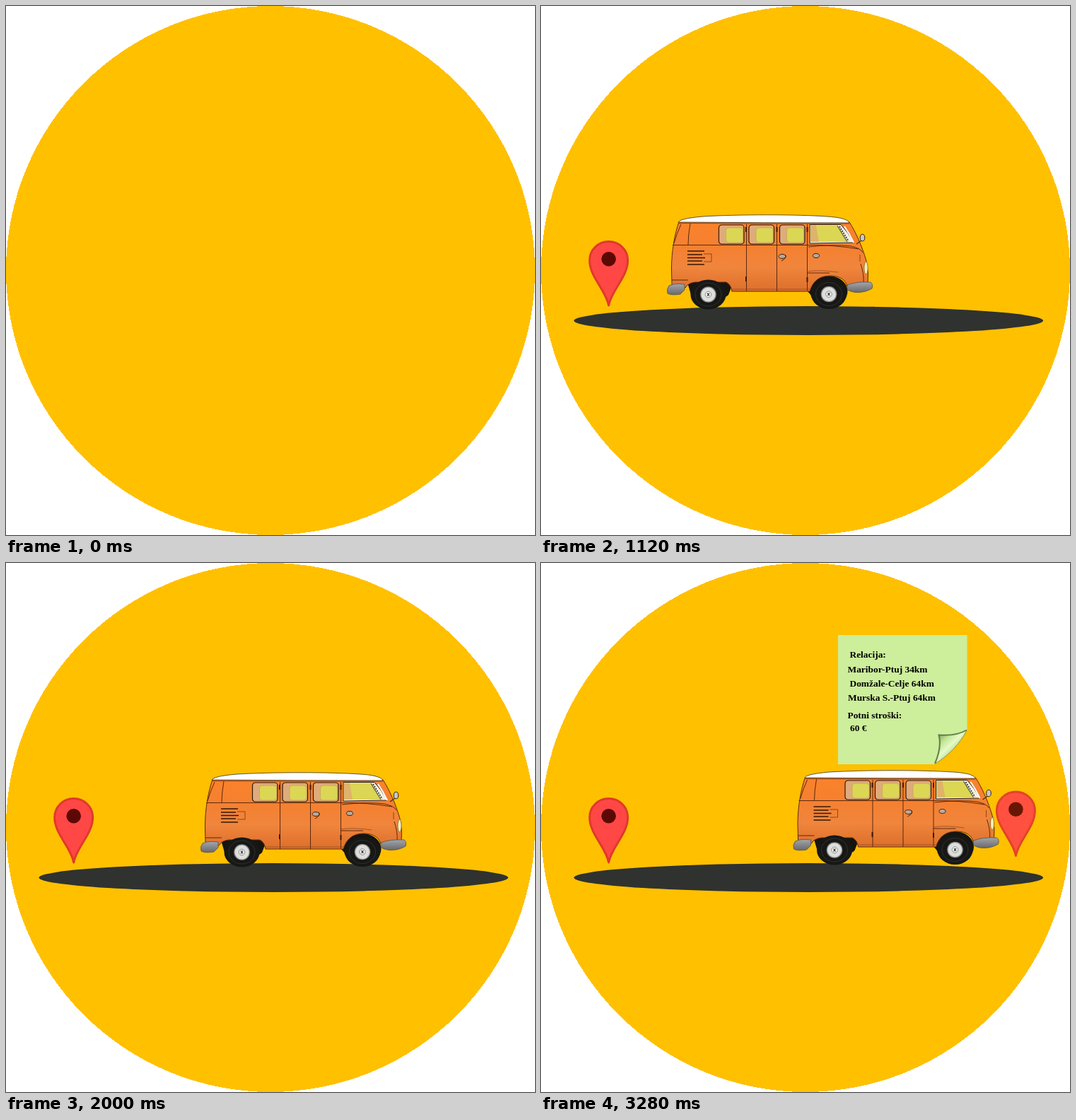
These frames come from a looping animation (748 px wide and 749 px high, 4080 ms). An HTML page:

```html
<!DOCTYPE html>
<html lang="sl">
<head>
<meta charset="utf-8">
<style>
html, body { margin: 0; width: 100%; height: 100%; overflow: hidden; background: #fff; }
svg { display: block; width: 100vw; height: 100vh; }
text { font: bold 13.4px "Liberation Serif", Times, serif; fill: #000; }
</style>
</head>
<body>
<svg viewBox="0 0 748 749" preserveAspectRatio="none">
  <defs>
    <linearGradient id="paint" x2="0" y2="1">
      <stop stop-color="#fb822b"/><stop offset=".35" stop-color="#f58030"/>
      <stop offset=".65" stop-color="#f0853c"/><stop offset="1" stop-color="#dc6f2b"/>
    </linearGradient>
    <linearGradient id="chrome" x2="0" y2="1">
      <stop stop-color="#a5a5a8"/><stop offset="1" stop-color="#68696d"/>
    </linearGradient>
    <linearGradient id="curl" x1=".15" y1=".1" x2=".75" y2=".75">
      <stop stop-color="#7f9f60"/><stop offset=".3" stop-color="#c4e597"/>
      <stop offset=".55" stop-color="#e6fac6"/><stop offset="1" stop-color="#9fc177"/>
    </linearGradient>
    <g id="pinShape">
      <path d="M95.700 424C92 402 68.700 384 68.700 360A27 26.500 0 0 1 122.700 360C122.700 384 99.500 402 95.700 424Z"
        fill="#ff4746" stroke="#e03a2a" stroke-width="3" stroke-linejoin="round"/>
      <circle cx="95.700" cy="358.300" r="10.300" fill="#5c0905"/>
    </g>
    <g id="wheel">
      <ellipse rx="25" ry="21" fill="#171816"/>
      <ellipse rx="18.500" ry="16.500" fill="none" stroke="#30312e"/>
      <circle r="11.300" fill="#8d8d8b"/>
      <circle r="10" fill="#dededc"/>
      <circle r="4.300" fill="#f1f1ef" stroke="#777" stroke-width=".8"/>
      <path d="M-1.500 -2L1.500 2M1.500 -2L-1.500 2" stroke="#222" stroke-width="1.200"/>
    </g>
    <g id="pane">
      <rect width="35.500" height="27" rx="4" fill="#e0ab7c" stroke="#2b1d10" stroke-width="1.200"/>
      <rect x="10" y="4" width="24" height="21" rx="4" fill="#dcd655" stroke="#b9a052" stroke-width=".6"/>
    </g>
  </defs>

  <ellipse cx="374" cy="374.500" rx="374" ry="374.500" fill="#ffc000" shape-rendering="crispEdges"/>
  <ellipse id="ground" cx="378.300" cy="445.500" rx="331.700" ry="20.500" fill="#2f322f"/>
  <use id="startPin" href="#pinShape"/>

  <g id="van">
    <!-- underside, far wheels and front arch -->
    <path d="M158 388H225L217 409Q211 415 203 412H165ZM328 403H345V414H338Z" fill="#171410"/>
    <ellipse cx="359" cy="404" rx="26.500" ry="22" fill="#171410"/>
    <!-- body -->
    <path d="M147 305.500C141 323 136.500 347 136.500 372L137 394Q137 399 141 399H156Q160 392 170 391H214Q221 395 222 404H332C336 391 344 382 361 382C376 382 383 389 385 397L414 393Q416 378 412 361C406 340 397 320 388 306Z"
      fill="url(#paint)" stroke="#5f2c0c"/>
    <path d="M146.500 306C147 303 158 300 181 298C230 295 315 295 356 298C374 299 386 302 388 307Q268 307 146.500 306Z"
      fill="#fff" stroke="#3d3016" stroke-width=".8"/>
    <path d="M147 307.500Q268 308.500 388 308" fill="none" stroke="#8c3e12"/>
    <!-- seams -->
    <g fill="none" stroke="#4a210c" stroke-width=".9">
      <path d="M138 338.500H328Q365 338 401 344M150 309Q144 322 140 336M163 308Q160 325 160 338"/>
      <path d="M242.500 309V404M285.500 309V404M328.500 309V403M328 378H360M137 388H160"/>
      <path d="M330 341Q367 337 390 340Q404 343 407 349M404 365Q409 380 408 392"/>
      <path d="M329 376Q345 373 372 377M222 401H332" stroke="#8e4519" stroke-width=".7"/>
      <path d="M182 351H193V362H182" stroke-width=".6"/>
    </g>
    <path d="M159 347H183M159 352H180M159 356.500H184M159 361H180M159 366H183" stroke="#34170a" stroke-width="1.500"/>
    <path d="M242 313V320M285.500 313V320M328.500 313V320M242 383V390M328.500 384V391" stroke="#3b1a08" stroke-width="2"/>
    <!-- glass -->
    <use href="#pane" x="203.500" y="310"/>
    <use href="#pane" x="246" y="310"/>
    <use href="#pane" x="289.500" y="310"/>
    <path d="M332 309.500H376Q387 321 394 335L332 336Z" fill="#f5f1df" stroke="#30210f"/>
    <path d="M333 310.500H371L384 334H333Z" fill="#dcd655"/>
    <path d="M333 310.500H341L345 334H333Z" fill="#e0b36a"/>
    <path d="M371 311L385 334" stroke="#564b2a" stroke-width="1.200"/>
    <path d="M374 312L387 333" stroke="#333" stroke-width="1.800" stroke-dasharray="2 1.500"/>
    <path d="M381 312Q388 322 394 335" fill="none" stroke="#fff" stroke-width="2"/>
    <!-- handles, mirror, lamp -->
    <g fill="#b8aaa0" stroke="#3a2010">
      <ellipse cx="293" cy="354.500" rx="5" ry="3"/>
      <path d="M297 352Q301 356 292 361" fill="none"/>
      <ellipse cx="341" cy="353.500" rx="4.500" ry="3"/>
      <path d="M398 337L405 332" stroke="#433" stroke-width="1.500"/>
      <ellipse cx="406.500" cy="328" rx="3.300" ry="4.800" fill="#c7c7c7"/>
      <ellipse cx="411.500" cy="371" rx="2.600" ry="9" fill="#f1eeb8" stroke="#a36a2c"/>
      <path d="M403 352V362" stroke="#8e4519"/>
    </g>
    <!-- bumpers -->
    <g fill="url(#chrome)" stroke="#54514c" stroke-width=".8">
      <path d="M133 396Q141 392 155 394V402L149 408Q136 410 131 407Q129 401 133 396Z"/>
      <path d="M385 395Q397 390 418 391Q422 394 420 400Q410 406 397 405.500Q387 404 385 401Z"/>
    </g>
    <use href="#wheel" x="188.500" y="408.500"/>
    <use href="#wheel" x="359" y="408"/>
  </g>

  <use id="endPin" href="#pinShape" x="575.700" y="-9.500"/>

  <g id="note">
    <path d="M420 102H602.500V236L556 285H420Z" fill="#cdee9b"/>
    <path d="M602.500 236C592 256 577 272 556 285C563 270 566 256 562 243C578 244 592 242 602.500 236Z" fill="url(#curl)"/>
    <path d="M602 236.500C592 242.500 578 244.500 562.500 243.500C566 257 563 270 557 284" fill="none" stroke="#5f7f47" stroke-width="2"/>
    <path d="M602 237C592 256 577 272 557 284.500" fill="none" stroke="#7d9b5c"/>
    <text x="436.500" y="133.500">Relacija:</text>
    <text x="433.500" y="155">Maribor-Ptuj 34km</text>
    <text x="436.500" y="175">Domžale-Celje 64km</text>
    <text x="434" y="195">Murska S.-Ptuj 64km</text>
    <text x="433.500" y="220">Potni stroški:</text>
    <text x="437" y="238">60 €</text>
  </g>
</svg>
<script>
const LOOP = 4080, STEP = 80, LAST = 3280;
// time, x shift, y shift
const drive = [
  [480, 0, 0], [560, 4, 0], [1120, 48, 0], [1440, 80, -1],
  [1680, 110, 0], [2000, 145, 1], [2240, 178, 0], [2720, 226.5, -2]
];
const part = id => document.getElementById(id);
const ramp = (t, from, to) => Math.min(1, Math.max(0, (t - from) / (to - from)));
const fade = (id, amount) => part(id).setAttribute("opacity", amount);

function vanShift(t) {
  let [, x, y] = drive[0];
  for (let i = 1; i < drive.length; i++) {
    const [t0, x0, y0] = drive[i - 1], [t1, x1, y1] = drive[i];
    const k = ramp(t, t0, t1);
    x += (x1 - x0) * k;
    y += (y1 - y0) * k;
  }
  return `translate(${x} ${y})`;
}

function draw(now) {
  const t = Math.min(LAST, Math.floor(now % LOOP / STEP) * STEP);
  fade("ground", ramp(t, 0, 240));
  fade("startPin", ramp(t, 80, 400));
  fade("van", ramp(t, 80, 400));
  fade("endPin", ramp(t, 2640, 3280) * 0.92);
  fade("note", ramp(t, 2880, 3200));
  part("van").setAttribute("transform", vanShift(t));
}

const start = performance.now();
function tick() {
  draw(performance.now() - start);
  requestAnimationFrame(tick);
}
tick();
</script>
</body>
</html>
```
